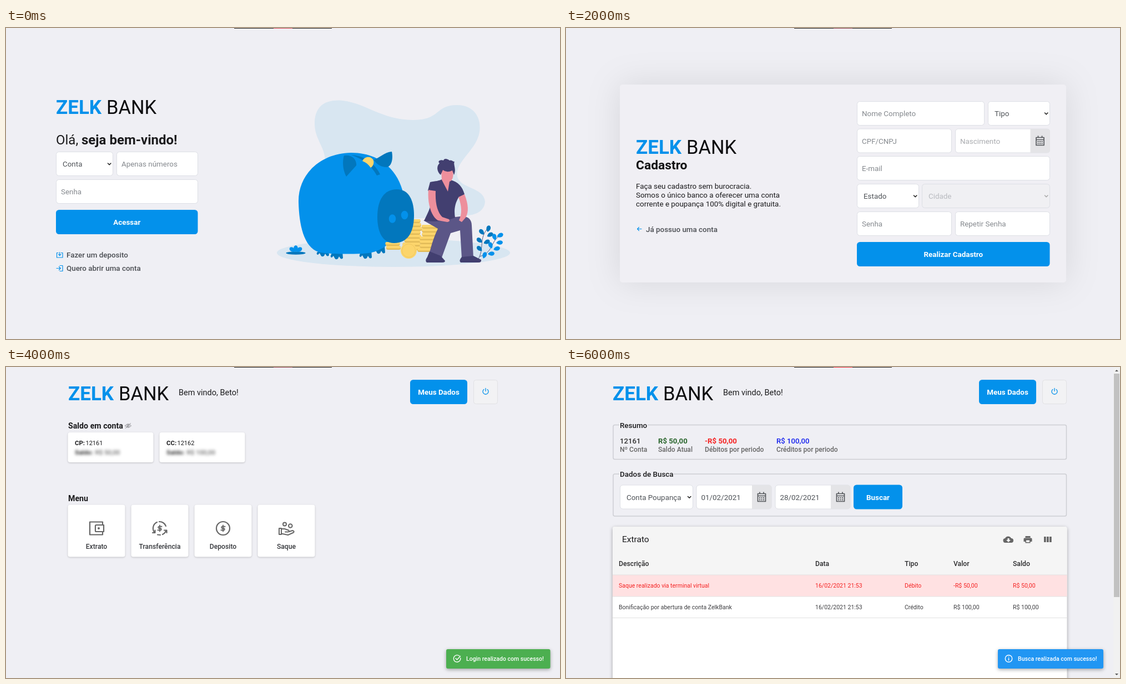
These frames come from a looping animation (998 by 561 pixels, 8000 ms). An HTML page:

```html
<!DOCTYPE html>
<html lang="pt-BR">
<head>
<meta charset="utf-8">
<title>Banco digital</title>
<style>
html, body { margin: 0; width: 100%; height: 100%; overflow: hidden; background: #efeff4; }
svg { display: block; width: 100%; height: 100%; }
text { font-family: Roboto, "Open Sans", sans-serif; white-space: pre; }
.card { filter: drop-shadow(0 1px 1.5px #0003); }
.panel { filter: drop-shadow(0 0 30px #0000001a); }
.toast { filter: drop-shadow(0 2px 3px #0005); }
.blur { filter: blur(2.4px); }
</style>
</head>
<body>
<svg id="stage" viewBox="0 0 998 561"></svg>
<script>
const BLUE = '#0391eb', DARK = '#0277bd', GREY = '#666', INK = '#1b1b1d', PAGE = '#efeff4';
const NAVY = '#423f70', PINK = '#ed8f9c', GOLD = '#fcd56c', HINT = '#85898e';

// Basic shapes
const text = (x, y, s, size = 13.4, color = INK, weight = 400, anchor = 'start') =>
  `<text x="${x}" y="${y}" font-size="${size}" fill="${color}" font-weight="${weight}" text-anchor="${anchor}">${s}</text>`;
const rect = (x, y, w, h, fill, r = 0, extra = '') =>
  `<rect x="${x}" y="${y}" width="${w}" height="${h}" rx="${r}" fill="${fill}" ${extra}/>`;
const oval = (x, y, rx, ry, fill, extra = '') =>
  `<ellipse cx="${x}" cy="${y}" rx="${rx}" ry="${ry}" fill="${fill}" ${extra}/>`;
const shape = (d, fill) => `<path d="${d}" fill="${fill}"/>`;
const line = (d, color, width = 1.5) =>
  `<path d="${d}" fill="none" stroke="${color}" stroke-width="${width}" stroke-linecap="round" stroke-linejoin="round"/>`;
const at = (x, y, s) => `<g transform="translate(${x} ${y})">${s}</g>`;

// Form parts
const box = (x, y, w, fill = '#fff') => rect(x + .5, y + .5, w - 1, 43, fill, 5, 'stroke="#dddfe5"');
const field = (x, y, w, s, color = HINT) => box(x, y, w) + text(x + 9, y + 27, s, 13.4, color);
const select = (x, y, w, s, off) => box(x, y, w, off ? '#f0f0f3' : '#fff') +
  text(x + 12, y + 27, s, 13.4, off ? '#b9bbc0' : '#4e5257') +
  line(`M${x + w - 9.5} ${y + 21}l2.7 2.7 2.7-2.7`, off ? '#aaa' : '#222', 1.6);
const button = (x, y, w, s) => rect(x, y, w, 44, BLUE, 5.5) +
  text(x + w / 2, y + 27, s, 13.4, '#fff', 700, 'middle');
const calendar = line('M-7-6H7V8H-7ZM-7-2H7M-3.500-8.500V-6M3.500-8.500V-6', '#55585c', 1.7) +
  [.5, 4].map(y => [-4.5, -1, 2.5].map(x => rect(x, y, 2, 2, '#55585c')).join('')).join('');
const dateField = (x, y, w, s, color) => field(x, y, w, s, color) +
  shape(`M${x + w - 35.5} ${y + .5}h30.500q5 0 5 5v33q0 5-5 5h-30.500z`, '#e4e4e7') +
  at(x + w - 18, y + 22, calendar);

const brand = (x, y) => text(x, y, 'ZELK', 35, BLUE, 700) + text(x + 91, y, 'BANK', 34.5, '#0c0c0e');
const link = (x, y, s) => text(x, y, s, 13.4, '#4b4e53', 500);
const topMark = red => rect(411, 0, 176, 1, '#222') + rect(482, 0, 34, 1, red);
const header = (x, bx) => brand(x, 60) + text(x + 199, 51, 'Bem vindo, Beto!', 14.5) +
  button(bx, 23, 103, 'Meus Dados') +
  rect(bx + 114.5, 23.5, 43, 43, '#f2f2f4', 4, 'stroke="#e1e1e4"') +
  at(bx + 136, 44, line('M-3.200-3.600a5 5 0 1 0 6.400 0M0-5.500v5', BLUE, 1.3));
const toast = (x, w, fill, s, mark) => rect(x, 509, w, 35, fill, 3, 'class="toast"') +
  at(x + 19.5, 526, line(mark, '#fff', 1.4)) + text(x + 36, 530, s, 10.5, '#fff', 500);

// Illustration
const coins = (x, top, n, w, drift = 0) => Array.from({length: n}, (_, i) => {
  const y = top + i * 7, left = x - w / 2 + (i % 3 - 1) * 1.5 + i * drift;
  return rect(left, y, w, 7, '#e2bb58', 3) + rect(left, y, w, 4.5, GOLD, 2.2);
}).reverse().join('');
const leaf = (x, y, turn, fill) => at(x, y, `<g transform="rotate(${turn})">${shape('M0 6C-5 2-5-5 0-6 5-5 5 2 0 6', fill)}</g>`);
const hoof = (x, y, w, h) => shape(`M${x} ${y}h${w}l1 ${h - 2}q-3 3-5 0l-2-3-2 4q-4 3-6-1l-2-4-3 3q-3 0-2-4z`, DARK);

const ground = oval(698, 405.5, 210, 25.5, '#d8e6f1') +
  shape('M575 245C577 215 555 202 556 170 557 141 575 128 607 131 651 137 676 165 733 166 783 166 772 140 811 139 841 138 857 160 853 187 848 221 808 241 813 268 818 290 861 287 863 313 862 331 845 338 828 338L720 345 575 300Z', '#d8e6f1');

const plants = oval(522, 406, 17.5, 2.7, DARK) +
  leaf(516, 400, -55, BLUE) + leaf(522, 398, 0, BLUE) + leaf(528, 400, 55, BLUE) +
  line('M850 418C863 398 850 380 869 360M854 412C880 404 872 382 892 374', '#555b82', 1) +
  [[869, 362, 15], [857, 368, -40], [872, 373, 60], [853, 383, -50], [866, 386, 65], [853, 398, -45]].map(p => leaf(...p, DARK)).join('') +
  [[890, 374, 65], [880, 377, -15], [889, 387, 85], [873, 392, -20], [884, 398, 75], [862, 410, 20], [874, 407, 85]].map(p => leaf(...p, BLUE)).join('');

const pig = hoof(566, 400, 15, 12) + hoof(589, 402, 17, 15) + hoof(641, 400, 17, 16) + hoof(665, 392, 17, 15) +
  shape('M527 314C526 266 564 226 622 225 676 225 710 260 717 306 721 365 690 406 643 407 610 408 579 408 563 404 536 395 528 354 527 314Z', BLUE) +
  shape('M609 230C624 228 632 238 631 248L613 268C606 255 606 239 609 230Z', DARK) +
  shape('M622 229C644 230 663 242 674 264L668 266C656 245 643 237 622 229Z', DARK) +
  shape('M662 238C674 234 681 224 695 223 698 237 694 250 686 251 675 251 669 246 662 238Z', DARK) +
  shape('M642 240C645 232 656 230 661 237 664 242 662 249 657 252 653 246 648 242 642 240Z', GOLD) +
  coins(698, 386, 2, 26) + coins(732, 345, 8, 32) +
  shape('M669 341C669 310 681 291 704 291 727 291 735 313 735 338 735 369 723 388 699 388 678 388 669 367 669 341Z', DARK) +
  oval(696, 344, 6.3, 7.8, BLUE) + oval(718, 337.5, 6.3, 7.8, BLUE) +
  oval(725.5, 401.5, 14.5, 14.5, GOLD) + oval(725.5, 401.5, 12, 12, 'none', 'stroke="#f2c85d"');

const sitter = coins(766, 355, 7, 31, -1.3) +
  shape('M752 347L817 340C832 338 839 345 839 356L842 415H821L818 365 801 370 785 414 763 405C767 389 772 374 778 362Z', '#5b5687') +
  shape('M763 403L783 411 791 420Q791 423 786 423H758Q754 420 759 413Z', NAVY) +
  shape('M821 413L842 411 856 418Q857 423 851 423H819Q815 420 821 413Z', NAVY) +
  shape('M764 278C774 276 780 276 785 273L801 274C815 278 822 286 826 300L815 306C808 318 807 330 809 342 796 348 774 350 753 348 759 335 768 320 767 302L760 293Z', NAVY) +
  shape('M784 256H805C807 268 804 276 799 277L796 295 785 274Z', PINK) +
  shape('M761 292L774 294C773 316 777 332 786 341L798 345Q801 349 795 350L778 347C764 338 759 312 761 292Z', PINK) +
  shape('M815 305L826 300C833 318 834 332 828 342L821 350 816 347C822 335 821 320 815 305Z', PINK) +
  shape('M783 265C775 258 776 248 781 244 776 240 784 237 788 239 789 234 796 236 799 239 803 237 804 241 808 241 805 246 812 254 807 265L804 257Q794 262 787 256Z', NAVY);

const login = () => topMark('#d84b58') + brand(90, 155) +
  text(90, 210, 'Olá,', 24) + text(136, 210, 'seja bem-vindo!', 24, INK, 600) +
  select(90, 223, 103, 'Conta') + field(199, 223, 147, 'Apenas números') +
  field(90, 273, 256, 'Senha') + button(90, 328, 255.5, 'Acessar') +
  line('M94 405.500H91.500V414H102V405.500H99.500M96.700 404.500V410M94.500 408.200L96.700 410.500 99 408.200', BLUE, 1.2) +
  line('M91 433.500H98M95.500 430.500L98.300 433.500 95.500 436.500M97 428.500H102V438.500H97', BLUE, 1.2) +
  link(109, 414, 'Fazer um deposito') + link(109, 438, 'Quero abrir uma conta') +
  ground + pig + plants + sitter;

const signUp = () => topMark('#8f3f4c') + rect(97, 102, 804, 357, '#f0eff4', 5, 'class="panel"') +
  brand(126, 227) + text(126, 255, 'Cadastro', 22.8, '#101012', 700) +
  ['Faça seu cadastro sem burocracia.', 'Somos o único banco a oferecer uma conta',
   'corrente e poupança 100% digital e gratuita.'].map((s, i) => text(126, 290 + i * 16, s)).join('') +
  line('M136 362.500H128.500M131.500 359.500L128.500 362.500 131.500 365.500', BLUE, 1.2) +
  link(144, 367.5, 'Já possuo uma conta') +
  field(524, 132, 230, 'Nome Completo') + select(760, 132, 112, 'Tipo') +
  field(524, 181.5, 171, 'CPF/CNPJ') + dateField(701, 181.5, 171, 'Nascimento', '#a9abaf') +
  field(524, 231, 348, 'E-mail') + select(524, 281, 112, 'Estado') + select(641, 281, 231, 'Cidade', true) +
  field(524, 331, 171, 'Senha') + field(701, 331, 171, 'Repetir Senha') +
  button(524, 386, 347.5, 'Realizar Cadastro');

const dollar = line('M3.600-3.300H-1.500a1.700 1.700 0 0 0 0 3.300h3a1.700 1.700 0 0 1 0 3.300H-3.600M0-5.500v11', GREY, 1.9);
const menuIcons = [
  line('M11-7.500V-11.500H-12V11.500H11V7.500M-.5-6H13V6H-.500Q-2 6-2 4.500V-4.500Q-2-6-.5-6Z', GREY, 2.2) + oval(4, 0, 2, 2, GREY),
  dollar + line('M-5-11A12 12 0 0 0-9 8M-13 8H-8.500V3.500M-1-12A12 12 0 0 1 11-4M5 11A12 12 0 0 0 11.500 3.500M8 3.500H12.500V8M-4 11.500L1 12', GREY, 2.2),
  dollar + line('M-12 0a12 12 0 1 0 24 0a12 12 0 1 0-24 0', GREY, 2.2),
  line('M-13 0h4v11h-4zM-9 1H-3L4 3.500Q6 6 3 6.500H-2M5 6L11 4Q15 5 13 7.500L3 12-9 9.500M-6-7.500a3 3 0 1 0 6 0a3 3 0 1 0-6 0M4-4.500a3.300 3.300 0 1 0 6.600 0a3.300 3.300 0 1 0-6.600 0', GREY, 2)
];
const account = (x, kind, number, total) => rect(x, 118, 154, 54, '#fff', 4, 'class="card"') +
  text(x + 12.5, 141, kind, 11.4, INK, 700) + text(x + 32, 141, number, 11) +
  `<g class="blur">${text(x + 12.5, 158, 'Saldo:', 11.6, '#333', 700) + text(x + 49, 158, total, 11.6, '#444')}</g>`;

const home = () => topMark('#8f3f4c') + header(112, 728) +
  text(112, 111, 'Saldo em conta', 14.2, INK, 700) +
  at(220, 106, line('M-5.500 0Q0-6.500 5.500 0 0 6.500-5.500 0M-2 0a2 2 0 1 0 4 0a2 2 0 1 0-4 0M-4.500 4.500L4.500-4.500', '#8a8a8e', 1)) +
  account(111.5, 'CP:', '12161', 'R$ 50,00') + account(276.5, 'CC:', '12162', 'R$ 100,00') +
  text(112, 241.5, 'Menu', 14.2, INK, 700) +
  ['Extrato', 'Transferência', 'Deposito', 'Saque'].map((s, i) => {
    const x = 111.5 + i * 114;
    return rect(x, 248.5, 103, 94, '#fff', 4, 'class="card"') + at(x + 51.5, 291, menuIcons[i]) +
      text(x + 51.5, 328, s, 12.2, '#36383c', 500, 'middle');
  }).join('') +
  toast(793, 187.5, '#4caf50', 'Login realizado com sucesso!', 'M4-5A6.300 6.300 0 1 0 6.300-1M-2.500-.5L0 2 6-4.500');

const group = (y, h, s, gap) => rect(85, y, 816.5, h, 'none', 3, 'stroke="#cdced3" stroke-width="1.5"') +
  rect(96, y - 2, gap, 4, PAGE) + text(97, y + 5, s, 13.4, INK, 500);
const columns = [95, 449, 610, 698, 805];
const row = (y, cells, size, color, weight) =>
  cells.map((s, i) => text(columns[i], y, s, size, color, weight)).join('');
const summary = [[97, '12161', 'Nº Conta', '#333', 500], [166, 'R$ 50,00', 'Saldo Atual', '#2b662e', 700],
  [250, '-R$ 50,00', 'Débitos por periodo', '#f52222', 600], [379, 'R$ 100,00', 'Créditos por periodo', '#1420ee', 500]];

const statement = () => topMark('#f0323c') + header(84, 744) +
  group(104.5, 62, 'Resumo', 51) +
  summary.map(([x, value, label, color, weight]) =>
    text(x, 137.5, value, 13.2, color, weight) + text(x, 152.5, label, 12.1, GREY, 500)).join('') +
  group(193, 76, 'Dados de Busca', 98) +
  select(97, 212.5, 132, 'Conta Poupança') +
  dateField(234.5, 212.5, 136, '01/02/2021', '#4e5257') + dateField(376.5, 212.5, 136, '28/02/2021', '#4e5257') +
  button(518, 212.5, 88, 'Buscar') +
  rect(84, 288, 818.5, 290, '#fff', 4, 'class="toast"') +
  shape('M84 375V292q0-4 4-4H898.500q4 0 4 4V375Z', '#f5f5f5') + text(101, 316, 'Extrato', 15.5) +
  at(797, 311, shape('M-5 6A4 4 0 0 1-6-2 6 6 0 0 1 5-2 4 4 0 0 1 5 6Z', GREY) + shape('M-1.500-2h3V1H4L0 5-4 1h2.500z', '#f5f5f5')) +
  at(832, 311, shape('M-4.500-6h9v3h-9zM-6-2.500H6Q7.500-2.500 7.500-1V4H4.500V6.500H-4.500V4H-7.500V-1Q-7.500-2.500-6-2.500Z', GREY) + rect(-3, 1.5, 6, 3.5, '#f5f5f5')) +
  [861, 866, 871].map(x => rect(x, 306, 3.7, 10, GREY)).join('') +
  row(359, ['Descrição', 'Data', 'Tipo', 'Valor', 'Saldo'], 12.2, '#2b2b2d', 500) +
  rect(84, 375, 818.5, 39, '#ffe1e2') +
  [374.5, 413.5, 452].map(y => rect(84, y, 818.5, 1, '#e1e1e1')).join('') +
  row(398, ['Saque realizado via terminal virtual', '16/02/2021 21:53', 'Débito', '-R$ 50,00', 'R$ 50,00'], 10.5, '#f52222', 400) +
  row(437, ['Bonificação por abertura de conta ZelkBank', '16/02/2021 21:53', 'Crédito', 'R$ 100,00', 'R$ 100,00'], 10.5, '#3d3d40', 400) +
  rect(986, 0, 12, 561, '#f1f1f1') + rect(987, 12, 10, 403, '#c1c1c1') +
  shape('M989 8h6l-3-3zM989 553h6l-3 3z', '#555') +
  toast(778, 190, '#2196f3', 'Busca realizada com sucesso!', 'M-6.200 0a6.200 6.200 0 1 0 12.400 0a6.200 6.200 0 1 0-12.400 0M0-.5v3.500M0-3v.1');

const stage = document.getElementById('stage');
stage.innerHTML = rect(0, 0, 998, 561, PAGE) +
  [login, signUp, home, statement].map(scene => `<g class="scene">${scene()}</g>`).join('');
const scenes = [...stage.querySelectorAll('.scene')];
const start = performance.now();

function show(now) {
  const current = Math.floor(Math.max(0, now - start) % 8000 / 2000);
  scenes.forEach((g, i) => g.style.display = i === current ? '' : 'none');
  requestAnimationFrame(show);
}
show(start);
</script>
</body>
</html>
```
